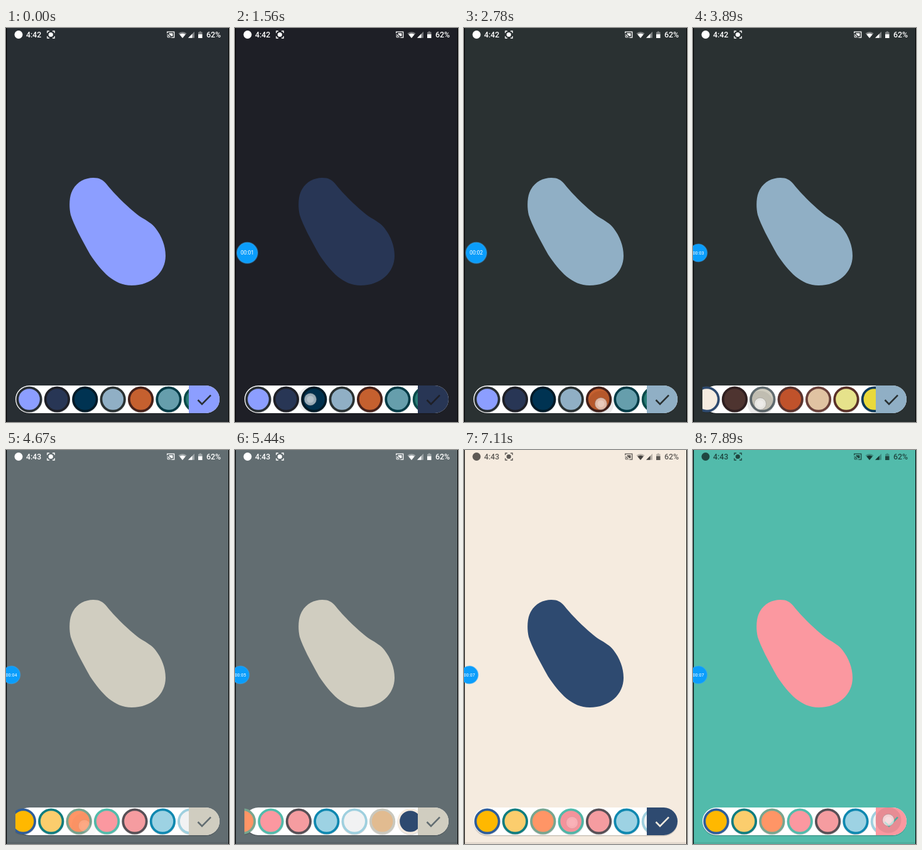
Animation of 355 by 626 pixels, one loop 8 s. Source, as an HTML page:

```html
<!DOCTYPE html>
<html lang="en">
<head>
<meta charset="utf-8">
<title>Colour picker</title>
<style>
  html, body { margin: 0; width: 100%; height: 100%; overflow: hidden; background: #000; }
  svg { display: block; width: 355px; height: 626px; font-family: Roboto, sans-serif; }
  .screen { fill: var(--bg); }
  .accent { fill: var(--fg); }
  .check { fill: none; stroke: var(--bg); stroke-width: 2.6; }
  .status { fill: var(--ink); font-size: 12.3px; font-weight: 500; }
  .line { fill: none; stroke: var(--ink); stroke-width: 1.3; }
  .dim { opacity: .4; }
  .time { fill: #fff; font-size: 8.5px; text-anchor: middle; }
</style>
</head>
<body>
<svg id="stage" viewBox="0 0 355 626">
  <defs>
    <clipPath id="strip"><rect x="15" y="566" width="276" height="48"/></clipPath>
  </defs>
  <rect width="355" height="626"/>
  <rect class="screen" x="1.2" width="352.8" height="626"/>
  <rect x="1.2" y="623" width="352.8" height="3" opacity=".07"/>

  <g class="status">
    <circle cx="20" cy="10.5" r="6.5"/>
    <text id="clock" x="32" y="15"></text>
    <circle cx="71.3" cy="10.5" r="3.6"/>
    <path class="line" d="M65.8 8V5H69M74 5h3.200v3M77.200 13v3H74M69 16h-3.200v-3"/>
    <path class="line" d="M256.700 8.500V6.200h11v9h-4.500M256.500 11a4.500 4.500 0 0 1 4.500 4.500M256.500 13.500a2 2 0 0 1 2 2"/>
    <path d="M259.500 8.300h6v4.800h-2.700q-1-2.500-3.300-3.200z"/>
    <path class="dim" d="M274.500 8.500q6.500-4.500 13 0L281 16z"/>
    <path d="M276.300 10.300q4.700-3 9.400 0L281 16z"/>
    <path class="dim" d="M290 15.800h10v-10z"/>
    <path d="M290 15.800h6.500V9.300z"/>
    <path class="dim" d="M306 6.500h2V5.300h2.500v1.200h2v4H306z"/>
    <path d="M306 10h6.500v6H306z"/>
    <text x="319" y="15">62%</text>
  </g>

  <path class="accent" d="M139 238C149 238 154 241 160 248C175 267 200 290 214 300C224 306 233 311 238 318C248 331 254 346 254 362C254 388 232 409 200 409C172 409 152 387 134 360C120 335 108 313 103 297C100 284 101 270 104 262C110 246 124 238 139 238Z"/>

  <rect x="15" y="569" width="325" height="44.500" rx="22" opacity=".18"/>
  <rect x="15" y="568" width="325" height="44" rx="22" fill="#fff"/>
  <g clip-path="url(#strip)"><g id="swatches"></g></g>
  <path class="accent" d="M291 568h27a22 22 0 0 1 0 44h-27z"/>
  <path class="check" d="M305.500 591l6.500 6.700L326 583.300"/>

  <g id="bubble">
    <circle r="16.500" fill="#0a9dfb" stroke="#3aaaf5" stroke-opacity=".4" stroke-width="2"/>
    <text class="time" id="timer" y="3"></text>
  </g>

  <g id="touch">
    <circle r="20.500" opacity=".08"/>
    <circle r="9.500" fill="#fff" fill-opacity=".6" stroke="#888" stroke-opacity=".5"/>
    <circle r="5.500" fill="#fff" fill-opacity=".25"/>
  </g>
</svg>
<script>
const LOOP = 8000, FPS = 9, PITCH = 44.4;

// fill and ring of every swatch
const palette = `8c9eff 282e33,283655 1e1f26,003352 011a27,90afc5 2a3132,c5602f 46211a,669eac 003b46,
  2a7d76 0a4a4a,c4dfe6 07575b,aebd38 505160,598234 2f4a28,f4cc70 20948b,f5ece0 2e4a6f,
  4e3430 301f20,d0cdc0 626d71,c0522b 5a332e,e0c3a2 6a403a,e6e28b 5a3028,e9d93c 0b3a5c,
  f18d9e 324851,98dbc6 5bc8ac,ffb800 2f5d9a,fbcd6d 0f7d7f,ff9566 77a58f,fb98a0 52bbab,
  f59ca0 575056,9dd2e3 0f88b0,f1f2f3 9fd0df,e1bb90 c9c8be,2e4a70 f5ebdf`
  .split(',').map(pair => pair.trim().split(' ').map(hex => '#' + hex));

// [time, swatch index]
const picks = [[0, 0], [990, 1], [1660, 2], [2430, 3], [3990, 13], [5660, 28], [7215, 23]];
// [start, end, distance]
const scrolls = [[2790, 3600, 503.4], [4300, 5200, 497.8], [6230, 6780, -113.2]];
// [start, end, x, y, x at release]
const touches = [
  [880, 1330, 82, 592], [1470, 1950, 120, 590], [2240, 2600, 170, 593],
  [2700, 3050, 218, 597, 100], [3780, 4110, 107, 597], [4250, 4710, 240, 597, 110],
  [5450, 5910, 273, 592], [6130, 6750, 213, 588, 300], [7080, 7500, 172, 592],
  [7800, 8300, 311, 588]
];

const $ = id => document.getElementById(id);
const clamp = v => Math.max(0, Math.min(1, v));
const progress = (t, start, end) => clamp((t - start) / (end - start));
const easeOut = u => 1 - (1 - u) ** 3;
const place = (el, x, y, scale = 1) =>
  el.setAttribute('transform', `translate(${x} ${y}) scale(${scale})`);

$('swatches').innerHTML = palette.map(([fill, ring], i) => {
  const x = 37 + i * PITCH;
  return `<circle cx="${x}" cy="591.2" r="20.6" opacity=".14"/>
    <circle cx="${x}" cy="590" r="18.7" fill="${fill}" stroke="${ring}" stroke-width="3.8"/>`;
}).join('');

function drawTouch(t) {
  const touch = touches.find(([start, end]) => t > start && t < end);
  $('touch').setAttribute('opacity', touch ? clamp(Math.min((t - touch[0]) / 80, (touch[1] - t) / 150)) : 0);
  if (!touch) return;
  const [start, end, x, y, endX = x] = touch;
  place($('touch'), x + (endX - x) * progress(t, start + 80, end), y);
}

function drawBubble(t) {
  const enter = easeOut(progress(t, 60, 500));
  const dock = easeOut(progress(t, 3100, 3400));
  place($('bubble'), -20 + 39.5 * enter - 11 * dock, 357.3, 1 - .15 * dock);
  $('timer').textContent = '00:0' + Math.max(0, Math.floor((t - 105) / 1000));
}

function draw(t) {
  const picked = picks.filter(([time]) => time <= t).pop()[1];
  const [fg, bg] = palette[picked];
  const style = $('stage').style;
  style.setProperty('--fg', fg);
  style.setProperty('--bg', bg);
  style.setProperty('--ink', t < 5660 ? '#fff' : 'rgba(0,0,0,.62)');
  $('clock').textContent = t < 4210 ? '4:42' : '4:43';

  const offset = scrolls.reduce((sum, [start, end, distance]) =>
    sum + distance * easeOut(progress(t, start, end)), 0);
  place($('swatches'), -offset, 0);
  drawBubble(t);
  drawTouch(t);
}

function tick() {
  const t = (performance.now() + 5) % LOOP;
  draw(Math.floor(t * FPS / 1000) * 1000 / FPS);
  requestAnimationFrame(tick);
}
tick();
</script>
</body>
</html>
```
